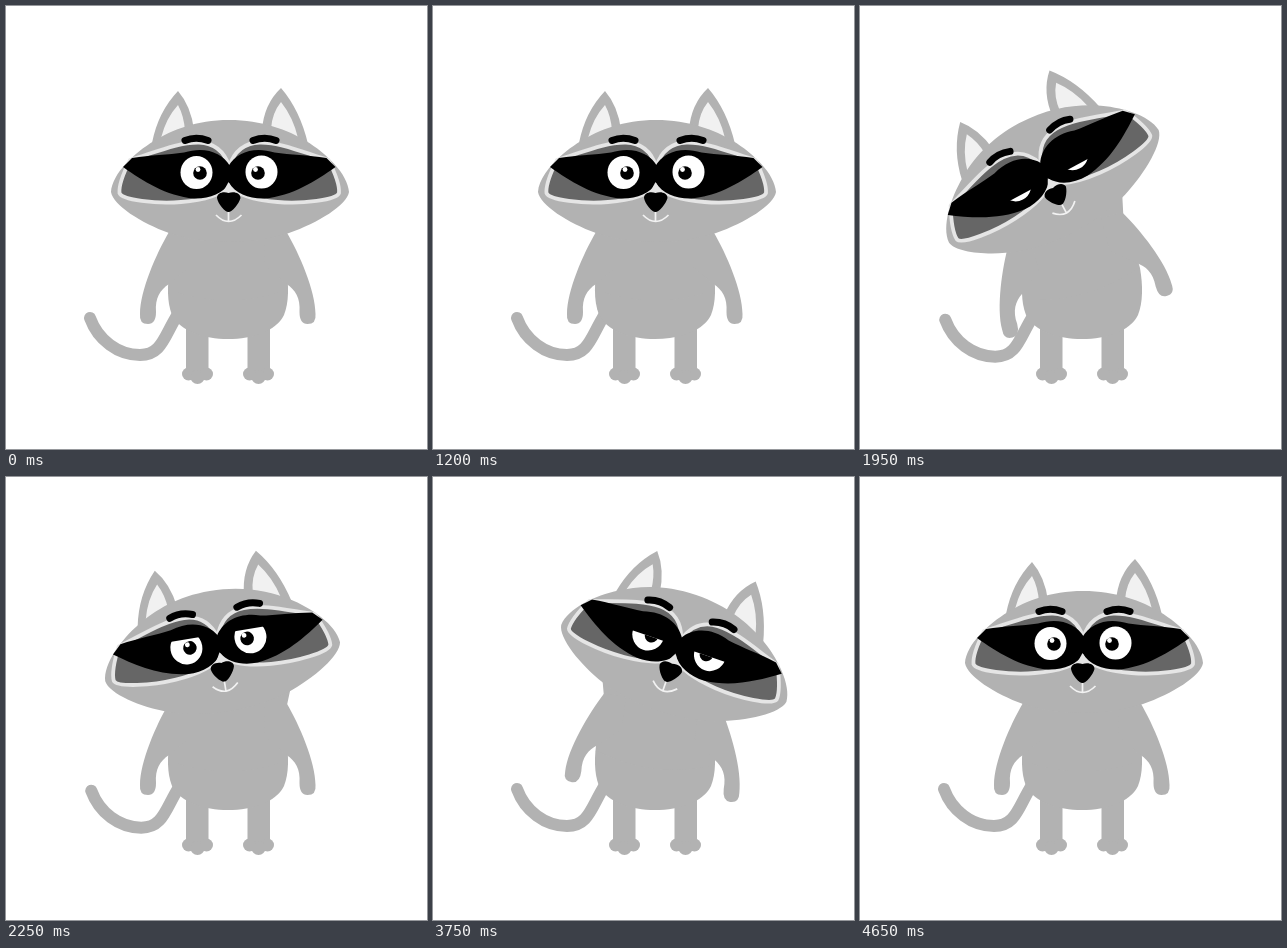
Recreate the animation shown at these times as an HTML page. Size 421 px wide and 443 px high, loop 4800 ms.

```html
<!DOCTYPE html>
<html lang="en">
<head>
<meta charset="utf-8">
<title>Raccoon</title>
<style>
html, body { margin: 0; width: 100%; height: 100%; overflow: hidden; background: #fff; }
svg { display: block; width: 100vw; height: 100vh; }
</style>
</head>
<body>
<svg viewBox="0 0 421 443" fill="#b2b2b2">
  <defs>
    <clipPath id="open"><rect id="lid" x="160" y="148" width="130" height="60"/></clipPath>
    <g id="leg">
      <path d="M180 310H202.500V368H180Z"/>
      <circle cx="182.500" cy="368" r="6.500"/>
      <circle cx="191.500" cy="371" r="7"/>
      <circle cx="200.500" cy="368" r="6.500"/>
    </g>
    <path id="arm" d="M163 226C150 248 134 285 134 308Q133 318 142 318Q150 318 150 306C149 292 154 284 163 278L185 260V226Z"/>
    <path id="patch" d="M223 160C218 145 208 137 193 136.500C173 136 150 146 124 154C116 170 113 182 113.500 187C116 194 150 198 175 196C200 194 216 188 223 180Z"/>
    <path id="mask" d="M117 161L126 152C145 149 162 149 178 146.500C198 140 216 146 224 160V176C217 188 203 193 188 192.500C160 190 137 175 117 161Z"/>
    <path id="brow" d="M179 134.500Q190 130 202 134.500" fill="none" stroke="#000" stroke-width="7" stroke-linecap="round"/>
  </defs>

  <path id="tail" d="M84 312C92 334 112 349 134 349C156 349 158 330 172 308" fill="none" stroke="#b2b2b2" stroke-width="12" stroke-linecap="round"/>
  <use href="#leg"/>
  <use href="#leg" transform="matrix(-1 0 0 1 444 0)"/>
  <path d="M172 235L164 262C161 280 161 296 166 309C174 325 198 333 222 333C247 333 270 325 278 309C283 296 283 280 280 262L272 235Z"/>

  <g id="torso">
    <path d="M163 228L157 200H287L281 228V284Q222 305 163 284Z"/>
    <use href="#arm"/>
    <use href="#arm" transform="matrix(-1 0 0 1 443.500 0)"/>
  </g>

  <g id="head">
    <path d="M146 137Q152 106 172 85Q185 100 188 124ZM256 124Q258 98 275 82Q294 104 302 138Z"/>
    <path d="M155 132Q160 112 172 99Q178 110 179 125ZM265 123Q266 107 275 96Q287 111 292 132Z" fill="#f1f1f1"/>
    <path d="M223 114C190 114 166 124 148 135C128 147 106 168 105 186C107 199 135 217 163 227C200 239 246 239 283 227C312 217 341 199 343 186C342 168 320 147 300 135C282 124 256 114 223 114Z"/>
    <g fill="#666" stroke="#e5e5e5" stroke-width="3.800" stroke-linejoin="round">
      <use href="#patch"/>
      <use href="#patch" transform="matrix(-1 0 0 1 446.500 0)"/>
    </g>
    <g fill="#000">
      <use href="#mask"/>
      <use href="#mask" transform="matrix(-1 0 0 1 446.500 0)"/>
      <use href="#brow"/>
      <use href="#brow" transform="matrix(-1 0 0 1 449 0)"/>
    </g>
    <g clip-path="url(#open)" fill="#fff">
      <ellipse cx="190.500" cy="166.500" rx="16" ry="16.500"/>
      <ellipse cx="255.500" cy="166" rx="16" ry="16.500"/>
      <g fill="#000"><circle cx="194" cy="167" r="6.800"/><circle cx="252" cy="167" r="6.800"/></g>
      <circle cx="192" cy="163.500" r="2.400"/><circle cx="249.500" cy="163.500" r="2.400"/>
    </g>
    <path d="M216 188L222.500 176L229 188Z" fill="#e5e5e5"/>
    <path d="M211 192C211 187 217 185 222.500 187C228 185 234.500 187 234.500 192C233 198 226 206 222.500 206C219 206 212 198 211 192Z" fill="#000"/>
    <path d="M222.500 206V215M210 209Q222.500 222 235.500 209" fill="none" stroke="#f2f2f2" stroke-width="1.700"/>
  </g>
</svg>
<script>
const STEP = 150, STEPS = 32, MAX_TILT = 37.7;
const LEFT = 12, RIGHT = 27, BLINKS = [4, LEFT, 20, RIGHT];
const [tail, torso, head, lid] = ['tail', 'torso', 'head', 'lid'].map(id => document.getElementById(id));

// Rises from 0 to 1 at the peak and falls back at the same rate
const pulse = (n, peak, half = 4) => Math.max(0, 1 - Math.abs(n - peak) / half);

function draw(now) {
  const n = Math.floor(now / STEP) % STEPS;
  const tilt = MAX_TILT * (pulse(n, RIGHT) - pulse(n, LEFT));
  const size = Math.abs(tilt), side = Math.sign(tilt);

  const shift = tilt * (1.1 + 0.0134 * size);
  head.setAttribute('transform', `translate(${shift} 0) rotate(${tilt} 218.5 160)`);

  // The torso follows once the head is well over
  const lean = 0.85 * Math.max(0, size - 10.5);
  torso.setAttribute('transform', `translate(0 ${-0.4 * lean}) rotate(${side * lean} 221 288)`);

  const wag = pulse(n, 4) + pulse(n, 14, 6);
  tail.setAttribute('transform', `translate(${1.5 * wag} ${2 * wag})`);

  lid.setAttribute('y', 148 + 40 * Math.max(...BLINKS.map(peak => pulse(n, peak))));
}

const start = performance.now();
function loop() {
  draw(performance.now() - start);
  requestAnimationFrame(loop);
}
loop();
</script>
</body>
</html>
```
